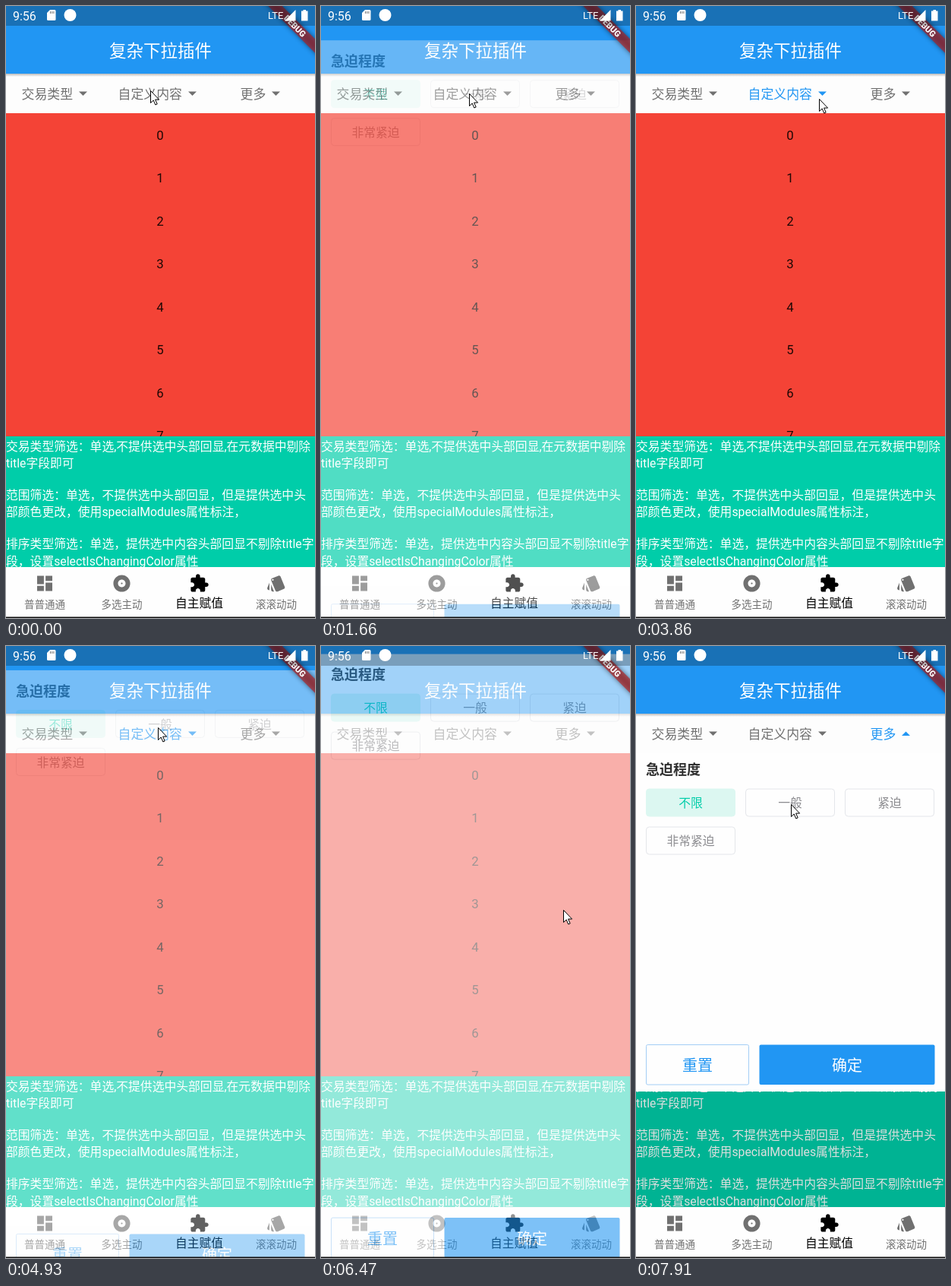
Animation, 407 px wide and 805 px high, one loop 8000 ms. Source, as an HTML page:

```html
<!DOCTYPE html>
<html lang="zh-CN">
<head>
<meta charset="utf-8">
<style>
html, body { margin: 0; width: 100%; height: 100%; overflow: hidden; background: #fff; }
svg { display: block; font-family: Roboto, "Noto Sans CJK SC", "Noto Sans CJK", sans-serif; cursor: default; }
text { white-space: pre; }
</style>
</head>
<body>
<script>
const W = 407, H = 805, LOOP = 8000;
const BLUE = '#2196f3', TEAL = '#00cda9', GREY = '#707070';

// ---------- drawing helpers ----------
const rect = (x, y, w, h, fill, more = '') =>
  `<rect x="${x}" y="${y}" width="${w}" height="${h}" fill="${fill}" ${more}/>`;
// cy is the optical middle of the line
const text = (x, cy, size, str, fill, more = '') =>
  `<text x="${x}" y="${cy + size * .37}" font-size="${size}" fill="${fill}" ${more}>${str}</text>`;
const label = (x, cy, size, str, fill, more = '') =>
  text(x, cy, size, str, fill, 'text-anchor="middle" ' + more);
const icon = (cx, cy, d, fill) =>
  `<path transform="translate(${cx} ${cy}) scale(1.11) translate(-12 -12)" d="${d}" fill="${fill}"/>`;

const ICONS = {
  board: 'M3 13h8V3H3v10zm0 8h8v-6H3v6zm10 0h8V11h-8v10zm0-18v6h8V3h-8z',
  disc: 'M12 2C6.48 2 2 6.48 2 12s4.48 10 10 10 10-4.48 10-10S17.52 2 12 2zm0 14.5c-2.49 0-4.5-2.01-4.5-4.5S9.51 7.5 12 7.5s4.5 2.01 4.5 4.5-2.01 4.5-4.5 4.5zm0-5.5c-.55 0-1 .45-1 1s.45 1 1 1 1-.45 1-1-.45-1-1-1z',
  puzzle: 'M20.5 11H19V7c0-1.1-.9-2-2-2h-4V3.5C13 2.12 11.88 1 10.5 1S8 2.12 8 3.5V5H4c-1.1 0-2 .9-2 2v3.8h1.5c1.49 0 2.7 1.21 2.7 2.7s-1.21 2.7-2.7 2.7H2V20c0 1.1.9 2 2 2h3.8v-1.5c0-1.49 1.21-2.7 2.7-2.7s2.7 1.21 2.7 2.7V22H17c1.1 0 2-.9 2-2v-4h1.5c1.38 0 2.5-1.12 2.5-2.5S21.88 11 20.5 11z',
  cards: 'M2.53 19.65l1.34.56v-9.03l-2.43 5.86c-.41 1.02.08 2.19 1.09 2.61zm19.5-3.7L17.07 3.98c-.31-.75-1.04-1.21-1.81-1.23-.26 0-.53.04-.79.15L7.1 5.95c-.75.31-1.21 1.03-1.23 1.8-.01.27.04.54.15.8l4.96 11.97c.31.76 1.05 1.22 1.83 1.23.26 0 .52-.05.77-.15l7.36-3.05c1.02-.42 1.51-1.59 1.09-2.6zM7.88 8.75c-.55 0-1-.45-1-1s.45-1 1-1 1 .45 1 1-.45 1-1 1zm-2 11c0 1.1.9 2 2 2h1.45l-3.45-8.34v6.34z'
};

const tab = (id, x, str, arrowX) => `<g id="${id}" fill="${GREY}">
  <text x="${x}" y="121.8" font-size="16.9">${str}</text>
  <path transform="translate(${arrowX} 115.3)" d="M-5.5-2.8h11L0 2.8z"/></g>`;

const CHIPS = ['不限', '一般', '紧迫', '非常紧迫'];
const chips = picked => CHIPS.map((str, i) => {
  const x = 13 + i % 3 * 131, y = i < 3 ? 52 : 102, on = i === picked;
  return rect(x + .5, y + .5, 117, 36, on ? '#dcf7f1' : '#fefefe',
      `rx="4" stroke="${on ? '#dcf7f1' : '#e4e6ea'}"`) +
    label(x + 59, y + 19, 15.8, str, on ? TEAL : '#8c8c90');
}).join('');
const form = picked =>
  text(13, 27, 18, '急迫程度', '#303030', 'font-weight="700"') + `<g class="chips">${chips(picked)}</g>`;
const buttons = rect(13.5, 741.5, 135, 52.5, '#fefefe', 'rx="2" stroke="#a3cdf5"') +
  label(81, 769, 20, '重置', BLUE) +
  rect(162.5, 741.5, 231, 52.5, BLUE, 'rx="2"') + label(278, 769, 20, '确定', '#fff');

const NOTES = [
  [579, '交易类型筛选：单选,不提供选中头部回显,在元数据中剔除'],
  [601.5, 'title字段即可'],
  [643, '范围筛选：单选，不提供选中头部回显，但是提供选中头'],
  [665.5, '部颜色更改，使用specialModules属性标注，'],
  [707.5, '排序类型筛选：单选，提供选中内容头部回显不剔除title字'],
  [730, '段，设置selectIsChangingColor属性']
];
const NAV = [[51, 'board', '普普通通'], [152.5, 'disc', '多选主动'],
  [254.5, 'puzzle', '自主赋值'], [356, 'cards', '滚滚动动']];

const home = rect(0, 0, W, H, '#fefefe') + rect(0, 141, W, 425, '#f44336') +
  Array.from({ length: 8 }, (_, i) => label(203, 169.5 + i * 56.5, 16.8, i, '#1e0805')).join('') +
  rect(0, 566, W, 172, TEAL) +
  NOTES.map(([y, str]) => text(0, y, 15.8, str, '#fff')).join('') +
  rect(0, 141, W, 597, '#000', 'id="dim"') +
  `<svg id="drop" y="141" width="${W}" height="0" overflow="hidden">${rect(0, 0, W, 445, '#fefefe')}
    <g transform="translate(0 -5.5)">${form(0)}</g><g id="dropButtons">${buttons}</g></svg>` +
  rect(0, 89, W, 52, '#fdfdfd') + rect(0, 89, W, 4, 'url(#shade)') + rect(0, 0, W, 89, BLUE) +
  label(203.5, 59, 22.5, '复杂下拉插件', '#fff') +
  tab('t0', 20.5, '交易类型', 101.5) + tab('t1', 147.5, '自定义内容', 245.5) + tab('t2', 308.5, '更多', 355.5) +
  rect(0, 738, W, 67, '#fefefe') +
  NAV.map(([x, name, str], i) => icon(x, 759.5, ICONS[name], i === 2 ? '#000' : GREY) +
    label(x, i === 2 ? 785.5 : 787, i === 2 ? 15.75 : 13.5, str, i === 2 ? '#000' : GREY)).join('');

const banner = `<g transform="translate(${W} 0) rotate(45) scale(1.09)">
  ${rect(-50, 28, 100, 12, '#000', 'opacity=".5" filter="url(#blur)"')}
  ${rect(-50, 28, 100, 12, '#b71c1c', 'opacity=".63"')}
  ${label(0, 34, 10.2, 'DEBUG', '#fff', 'font-weight="900"')}</g>`;

const status = rect(0, 0, W, 26, '#000', 'opacity=".25"') +
  text(9, 13, 16, '9:56', '#fff') +
  '<path d="M58 5h6q1.500 0 1.500 1.500V17.500q0 1.500-1.500 1.500H55.500q-1.500 0-1.500-1.500V9z" fill="#fff"/>' +
  '<path d="M58.500 7v3M60.700 7v3M62.900 7v3" stroke="#777" stroke-width="1"/>' +
  '<circle cx="84.500" cy="12" r="8" fill="#fff"/>' +
  text(345, 12.500, 13, 'LTE', '#fff') +
  '<path d="M367 19.500L381.500 5V19.500z" fill="#fff"/>' +
  '<path d="M389 6.500h2.500V5h3.500v1.500h2.500V19.500H389z" fill="#fff"/>';

document.body.innerHTML = `<svg width="${W}" height="${H}" viewBox="0 0 ${W} ${H}">
  <defs>
    <linearGradient id="shade" x2="0" y2="1"><stop stop-color="#bbb"/><stop offset="1" stop-color="#fdfdfd"/></linearGradient>
    <filter id="blur" x="-20%" y="-100%" width="140%" height="300%"><feGaussianBlur stdDeviation="3"/></filter>
  </defs>
  ${home}
  <g id="page">${rect(0, 0, W, H, '#fefefe')}${form(0)}${buttons}</g>
  ${rect(0, 803.5, W, 1.5, '#111')}
  ${banner}${status}
  <path id="mouse" d="M.5.5v16l3.700-3.500 2.600 6 2.400-1-2.600-5.900h5z" fill="#fff" stroke="#000"/>
</svg>`;

// ---------- motion ----------
const $ = id => document.getElementById(id);
const clamp = v => Math.min(1, Math.max(0, v));
const ramp = (t, start, length) => clamp((t - start) / length);
const bezier = (x1, y1, x2, y2) => x => {
  const at = (a, b, s) => 3 * a * s * (1 - s) ** 2 + 3 * b * s * s * (1 - s) + s ** 3;
  let lo = 0, hi = 1;
  for (let i = 0; i < 24; i++) {
    const mid = (lo + hi) / 2;
    if (at(x1, x2, mid) < x) lo = mid; else hi = mid;
  }
  return at(y1, y2, lo);
};
const slide = bezier(.4, 0, .2, 1), fade = bezier(.42, 0, 1, 1);

// The screen is refreshed only at these moments
const TICKS = [0, 120, 400, 990, 1120, 1540, 1660, 1780, 1920, 2060, 2200, 2340, 2480,
  2630, 2760, 2880, 3020, 3160, 3300, 3450, 3590, 3720, 3860, 3980, 4100,
  4510, 4650, 4790, 4930, 5080, 5230, 5380, 5660, 5800, 5930, 6070, 6200, 6340, 6470, 6620,
  6740, 6890, 7030, 7180, 7320, 7470, 7610, 7760, 7910];

// time, x, y of the pointer tip
const PATH = [[0, 190, 111], [120, 190, 110], [400, 189, 109], [990, 192, 112], [1120, 195, 115],
  [1780, 195, 115], [2340, 203, 72], [2630, 203, 70], [2880, 225, 567], [3160, 262, 745],
  [3450, 271, 771], [3590, 271, 771], [3720, 256, 330], [3860, 241, 122], [4100, 240, 118],
  [4510, 210, 110], [4790, 200, 107], [5080, 200, 107], [5380, 205, 125], [5660, 230, 300],
  [6070, 295, 760], [6340, 300, 768], [6470, 319, 347], [6620, 332, 135], [6890, 334, 114],
  [7180, 334, 114], [7470, 280, 175], [7760, 219, 209], [7910, 204, 208]];
const pointer = t => {
  const i = PATH.findLastIndex(p => p[0] <= t), a = PATH[i], b = PATH[i + 1] || a;
  const k = a === b ? 0 : (t - a[0]) / (b[0] - a[0]);
  return [a[1] + (b[1] - a[1]) * k, a[2] + (b[2] - a[2]) * k];
};

const pageChips = document.querySelector('#page .chips');
let picked = 0;

function draw(t) {
  const open = ramp(t, 1510, 300) - ramp(t, 3600, 120) + ramp(t, 4762, 300) - ramp(t, 6386, 300);
  $('page').setAttribute('opacity', fade(open));
  $('page').setAttribute('transform', `translate(0 ${(1 - slide(open)) * H / 4})`);

  const choice = t >= 2630 && t < 4700 ? 1 : 0;
  if (choice !== picked) pageChips.innerHTML = chips(picked = choice);
  $('t1').setAttribute('fill', t >= 3600 && t < 6386 ? BLUE : GREY);

  const drop = slide(ramp(t, 6960, 300)), height = 445 * drop;
  $('drop').setAttribute('height', height);
  $('dropButtons').setAttribute('transform', `translate(0 ${height - 803})`);
  $('dim').setAttribute('opacity', .13 * drop);
  $('t2').setAttribute('fill', t >= 6960 ? BLUE : GREY);
  $('t2').lastElementChild.setAttribute('transform', `translate(355.5 115.3) scale(1 ${t >= 6960 ? -1 : 1})`);

  $('mouse').setAttribute('transform', `translate(${pointer(t)})`);
}

function loop() {
  const now = performance.now() % LOOP;
  draw(TICKS.findLast(tick => tick <= now));
  requestAnimationFrame(loop);
}
loop();
</script>
</body>
</html>
```
